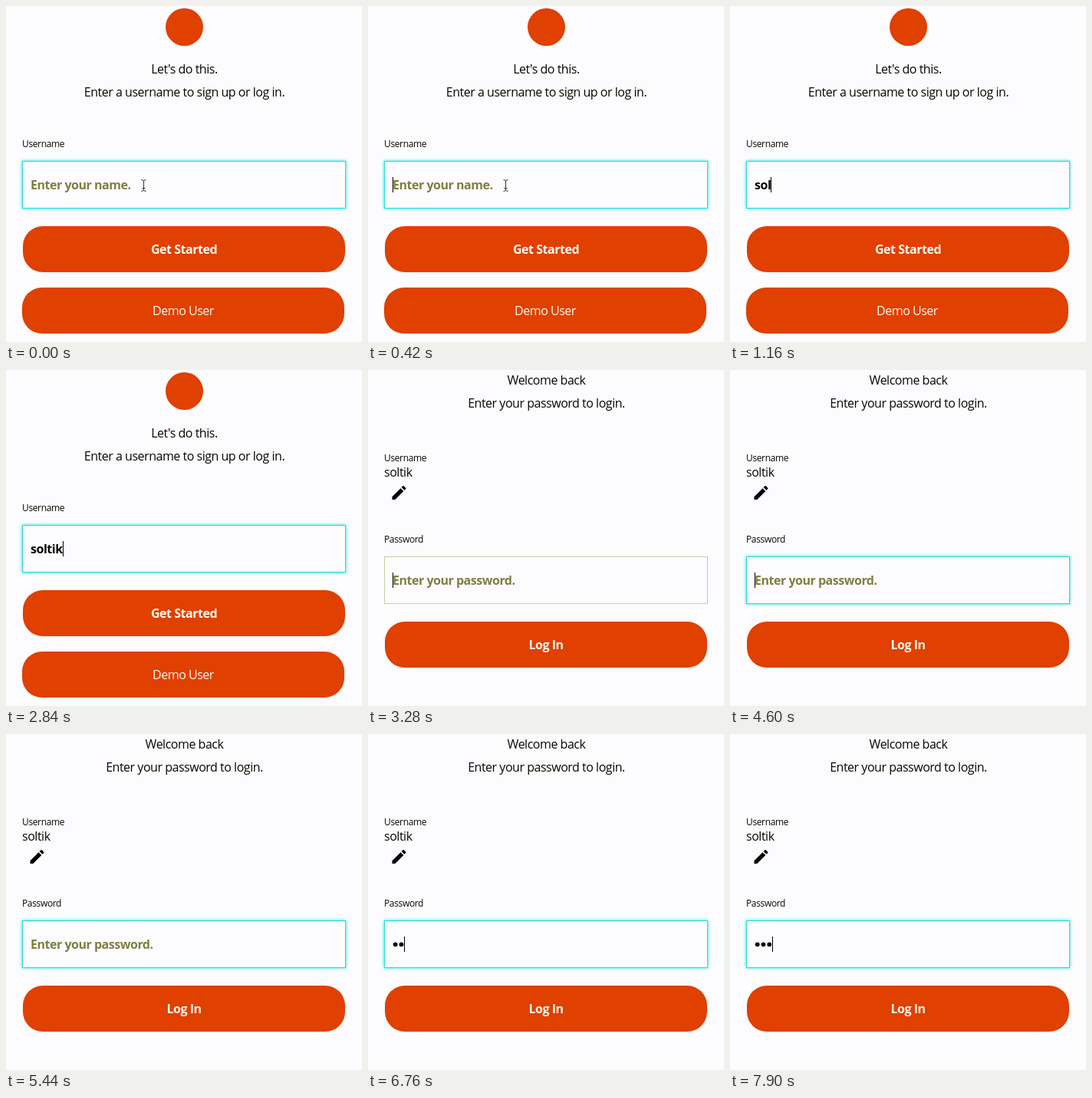
Animation, 464 px wide and 438 px high, one loop 8000 ms. Source, as an HTML page with a canvas:

```html
<!DOCTYPE html>
<html lang="en">
<head>
<meta charset="utf-8">
<title>Sign in</title>
<style>
html, body { margin: 0; width: 100%; height: 100%; overflow: hidden; background: #fcfcfe; }
canvas { display: block; }
</style>
</head>
<body>
<canvas id="stage" width="464" height="438"></canvas>
<script>
const LOOP = 8000, SWITCH = 3280, BLINK = 530;
const USER = 'soltik';
const nameKeys = [640, 880, 1080, 1320, 1540, 1760];
const passKeys = [6240, 6760, 7580];
const PAPER = '#fcfcfe', ORANGE = '#e04000', INK = '#080800', HINT = '#7e7f42', PALE = '#fffdf0';
const pencil = new Path2D('M3 17.25V21h3.75L17.81 9.94l-3.75-3.75L3 17.25zM20.71 7.04c.39-.39.39-1.02 0-1.41l-2.34-2.34c-.39-.39-1.02-.39-1.41 0l-1.83 1.83 3.75 3.75 1.83-1.83z');
const c = document.getElementById('stage').getContext('2d');

function text(s, x, y, { size = 16, bold = false, color = INK, align = 'left' } = {}) {
  c.font = `${bold ? 700 : 400} ${size}px "Open Sans", "Noto Sans", sans-serif`;
  c.letterSpacing = `${-0.03 * size}px`;
  c.textAlign = align;
  c.fillStyle = color;
  c.fillText(s, x, y);
}

const centred = (s, y) => text(s, 232.5, y, { align: 'center' });
const label = (s, y) => text(s, 21, y, { size: 12 });

function disc(x, y, r, color) {
  c.fillStyle = color;
  c.beginPath();
  c.arc(x, y, r, 0, 2 * Math.PI);
  c.fill();
}

function button(s, x, y, bold) {
  c.fillStyle = ORANGE;
  c.beginPath();
  c.roundRect(x, y, 420, 60, 26);
  c.fill();
  text(s, x + 210, y + 36, { bold, color: PALE, align: 'center' });
}

// focus runs from 0 (plain border) to 1 (glowing ring)
function field(y, focus) {
  const mix = (a, b) => Math.round(a + (b - a) * focus);
  c.save();
  c.shadowColor = `rgba(30, 220, 220, ${focus})`;
  c.shadowBlur = 4;
  c.fillStyle = PAPER;
  c.fillRect(21, y, 422, 62);
  c.restore();
  c.strokeStyle = `rgb(${mix(198, 34)}, ${mix(207, 220)}, ${mix(166, 216)})`;
  c.strokeRect(21.5, y + 0.5, 421, 61);
}

function caret(x, y) {
  c.fillStyle = '#000';
  c.fillRect(Math.round(x), y, 1, 20);
}

function mouse(x, y) {
  c.strokeStyle = '#333320';
  c.stroke(new Path2D(`M${x - 3} ${y - 7.5}q3 0 3 2v11q0 2 -3 2M${x + 3} ${y - 7.5}q-3 0 -3 2v11q0 2 3 2M${x - 2} ${y + 3.5}h4`));
}

const typed = (keys, t) => keys.filter(k => k <= t).length;
const lit = (t, since) => Math.floor((t - since) / BLINK) % 2 === 0;

function signUp(t) {
  const n = typed(nameKeys, t);
  disc(232.5, 27.5, 24.5, ORANGE);
  centred("Let's do this.", 88);
  centred('Enter a username to sign up or log in.', 118);
  label('Username', 184);
  field(202, 1);
  const s = USER.slice(0, n);
  text(s || 'Enter your name.', 32, 239, { bold: true, color: n ? INK : HINT });
  const end = n ? 32 + c.measureText(s).width : 32;
  if (n ? lit(t, nameKeys[n - 1]) : t >= 110) caret(end, 223);
  if (!n) mouse(179.5, 234);
  button('Get Started', 22, 287, true);
  button('Demo User', 21, 367, false);
}

function logIn(t) {
  const n = typed(passKeys, t);
  centred('Welcome back', 19);
  centred('Enter your password to login.', 49);
  label('Username', 119);
  text(USER, 21, 139);
  c.save();
  c.translate(28.5, 148);
  c.fillStyle = '#000';
  c.fill(pencil);
  c.restore();
  label('Password', 225);
  field(243, Math.min(1, (t - SWITCH) / 300));
  if (!n) text('Enter your password.', 32, 280, { bold: true, color: HINT });
  for (let i = 0; i < n; i++) disc(35.7 + 7.8 * i, 274.3, 2.9, INK);
  if (n || t < 3380 || lit(t, 3380)) caret(31.6 + 7.8 * n, 264);
  button('Log In', 22, 328, true);
}

function draw() {
  const t = performance.now() % LOOP;
  c.fillStyle = PAPER;
  c.fillRect(0, 0, 464, 438);
  (t < SWITCH ? signUp : logIn)(t);
  requestAnimationFrame(draw);
}
draw();
</script>
</body>
</html>
```
